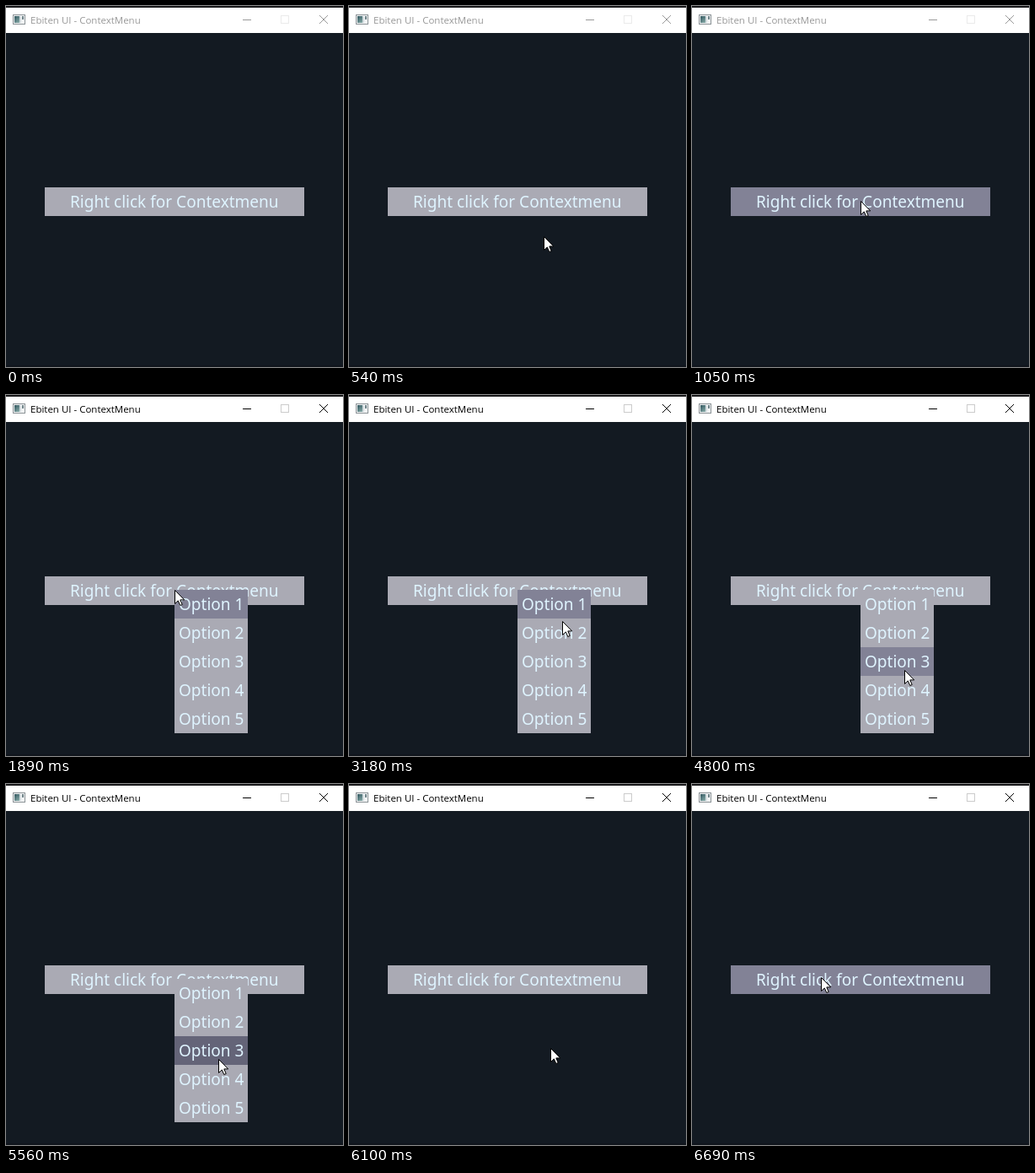
An HTML page with a canvas that plays this animation: 400 px wide and 428 px high, repeating every 8 s.

```html
<!DOCTYPE html>
<html lang="en">
<head>
<meta charset="utf-8">
<title>Context menu</title>
<style>
html, body { margin: 0; width: 100%; height: 100%; overflow: hidden; background: #131a22; }
canvas { display: block; }
</style>
</head>
<body>
<canvas id="stage" width="400" height="428"></canvas>
<script>
const ctx = document.getElementById('stage').getContext('2d');
const LOOP = 8000;
const IDLE = '#aaaab4', HOVER = '#828296', PRESSED = '#646478';
const FOCUS = 1660, OPEN = 1700, CLOSE = 5620;
const MENU = { x: 200, y: 231, w: 87, row: 34 };

const linear = u => u;
const easeOut = u => 1 - (1 - u) ** 2;
const smooth = u => u * u * (3 - 2 * u);

// Pointer stops: time, x, y, easing of the way there
const path = [
  [110, 343, 418, linear],
  [900, 202, 235, easeOut],
  [1050, 200, 231, easeOut],
  [2380, 200, 231, linear],
  [2640, 248, 246, smooth],
  [2820, 248, 246, linear],
  [3180, 253, 268, linear],
  [3610, 255, 284, easeOut],
  [4180, 257, 303, linear],
  [4420, 255, 315, linear],
  [4800, 252, 326, easeOut],
  [5930, 252, 326, linear],
  [6690, 153, 229, smooth]
];

function pointerAt(t) {
  const i = path.findIndex(p => p[0] > t);
  if (i === 0) return { x: path[0][1], y: path[0][2] };
  if (i < 0) return { x: path.at(-1)[1], y: path.at(-1)[2] };
  const [t0, x0, y0] = path[i - 1], [t1, x1, y1, ease] = path[i];
  const u = ease((t - t0) / (t1 - t0));
  return { x: Math.round(x0 + (x1 - x0) * u), y: Math.round(y0 + (y1 - y0) * u) };
}

function rect(color, x, y, w, h) {
  ctx.fillStyle = color;
  ctx.fillRect(x, y, w, h);
}

function text(str, x, y, color, font) {
  ctx.font = font;
  ctx.fillStyle = color;
  ctx.fillText(str, x, y);
}

function label(str, x, y) {
  text(str, x, y, '#dff4ff', '19.05px "Noto Sans", sans-serif');
}

function drawIcon() {
  rect('#8b9296', 8, 10, 15, 12);
  rect('#f2f4f5', 9, 11, 13, 10);
  const shade = ctx.createLinearGradient(10, 12, 17, 20);
  shade.addColorStop(0, '#33575f');
  shade.addColorStop(1, '#8fb3b0');
  rect(shade, 10, 12, 6, 8);
  rect('#d5dde0', 16, 12, 2, 8);
  rect('#6f8388', 19, 12, 2, 4);
}

function drawTitleBar(focused) {
  const ink = focused ? '#000' : '#999';
  rect('#1b1b1d', 0, 0, 400, 2);
  rect('#fff', 0, 2, 400, 30);
  drawIcon();
  text('Ebiten UI - ContextMenu', 29, 21, ink, '11.5px "Open Sans", sans-serif');
  rect(ink, 281, 16, 10, 1);
  ctx.lineWidth = 1;
  ctx.strokeStyle = focused ? '#ccc' : '#ebebeb';
  ctx.strokeRect(326.5, 11.5, 9, 9);
  ctx.strokeStyle = ink;
  ctx.beginPath();
  ctx.moveTo(372, 11);
  ctx.lineTo(382, 21);
  ctx.moveTo(382, 11);
  ctx.lineTo(372, 21);
  ctx.stroke();
}

function drawMenu(hot, hotColor) {
  const { x, y, w, row } = MENU;
  for (let i = 0; i < 5; i++) {
    rect(i === hot ? hotColor : IDLE, x, y + i * row, w, row);
    label('Option ' + (i + 1), x + 5, y + i * row + 24);
  }
}

function drawClick(p, color) {
  ctx.fillStyle = color;
  ctx.beginPath();
  ctx.arc(p.x, p.y, 12, 0, 7);
  ctx.fill();
}

const arrow = new Path2D('M.5 .5V16.5L4.3 12.9L6.8 18.5L9.2 17.5L6.8 11.9H11.7Z');

function drawPointer(p) {
  ctx.save();
  ctx.translate(p.x, p.y);
  ctx.fillStyle = '#fff';
  ctx.strokeStyle = '#000';
  ctx.fill(arrow);
  ctx.stroke(arrow);
  ctx.restore();
}

function draw(t) {
  const p = pointerAt(t);
  const within = (a, b) => t >= a && t < b;
  const menuOpen = within(OPEN, CLOSE);

  rect('#131a22', 0, 32, 400, 396);
  rect('#10151c', 0, 426, 400, 2);
  drawTitleBar(t >= FOCUS);

  rect(!menuOpen && p.y < 249 ? HOVER : IDLE, 46, 215, 308, 34);
  label('Right click for Contextmenu', 76, 239);

  if (menuOpen) {
    // Highlight trails the pointer by a few pixels
    const row = Math.max(0, Math.floor((p.y - MENU.y - 4) / MENU.row));
    drawMenu(t < 1740 ? -1 : row, t >= 5430 ? PRESSED : HOVER);
  }

  if (within(FOCUS, 1890)) drawClick(p, 'rgba(255, 0, 0, .47)');
  if (within(5390, 5560)) drawClick(p, 'rgba(255, 255, 0, .47)');
  if (t >= 110) drawPointer(p);
}

const start = performance.now();
function tick(now) {
  draw(Math.max(0, now - start) % LOOP);
  requestAnimationFrame(tick);
}
draw(0);
requestAnimationFrame(tick);
</script>
</body>
</html>
```
